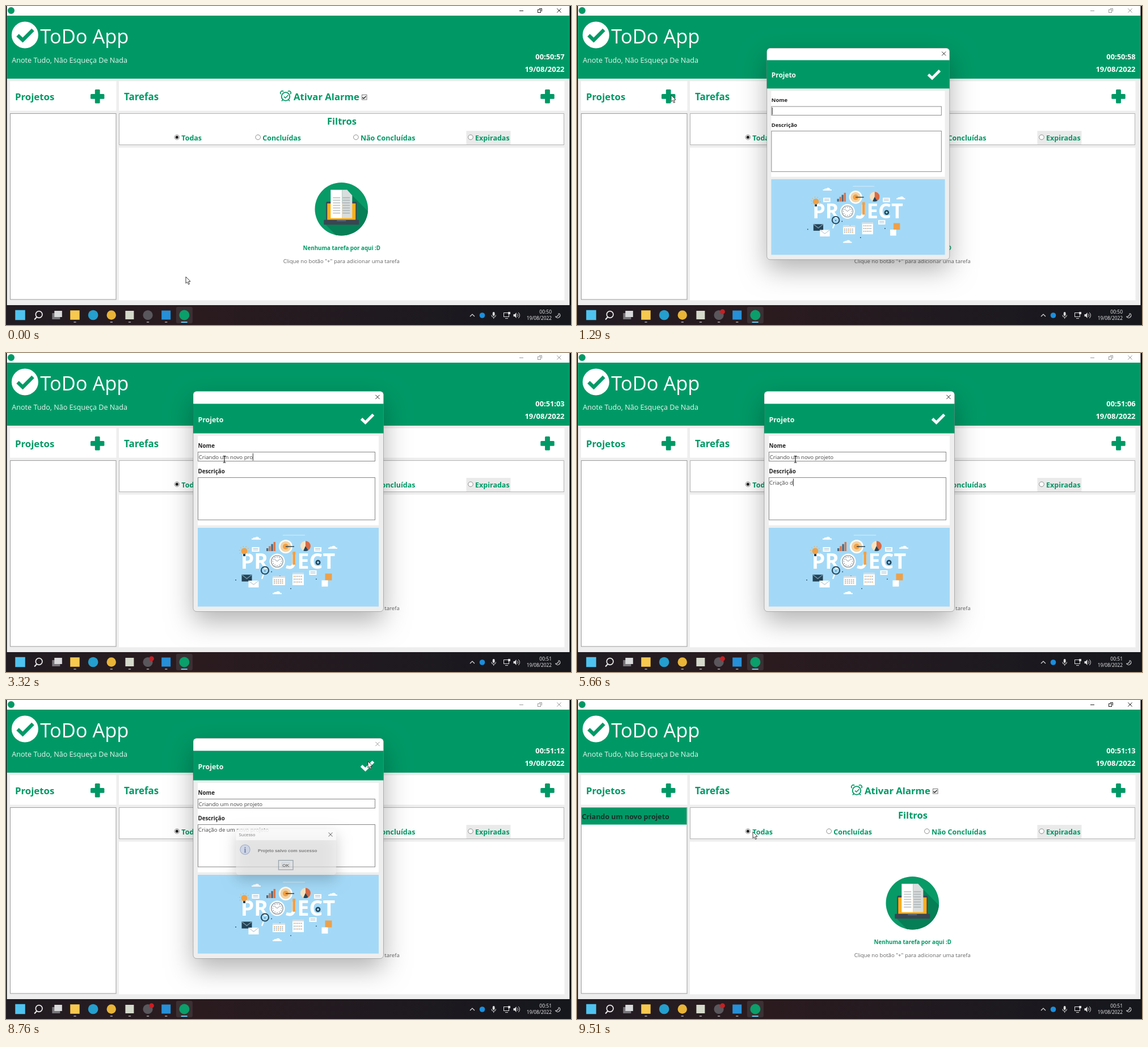
These frames come from a looping animation (996x562 px, 9.54 s). An HTML page with a canvas:

```html
<!DOCTYPE html>
<html lang="pt">
<head>
<meta charset="utf-8">
<title>ToDo App</title>
<style>
html, body { margin: 0; width: 100%; height: 100%; overflow: hidden; background: #000; }
canvas { display: block; width: 100%; height: 100%; }
</style>
</head>
<body>
<canvas id="stage" width="996" height="562"></canvas>
<script>
const ctx = document.getElementById('stage').getContext('2d');
const LOOP = 9540;
const OPEN = 1170, ALERT = 8668, CLOSE = 9090;
const GREEN = '#009966', NAVY = '#234357', ORANGE = '#f3a043', SKY = '#a3d9f7';
const SANS = '"Open Sans", "Noto Sans", sans-serif';
const ARIAL = '"Liberation Sans", sans-serif';
const NAME = 'Criando um novo projeto';
const ABOUT = 'Criação de um novo projeto';
const DATE = '19/08/2022';

// Keys: time, value
const SECONDS = [[0, 0], [960, 1], [3250, 6], [5300, 9], [8600, 15], [9270, 16]];
const NAME_KEYS = [[2720, 0], [3430, 23]];
const ABOUT_KEYS = [[5130, 0], [5660, 9.3], [7460, 20.4], [7960, 26]];
// Pointer moves: start, end, x, y
const MOVES = [[120, 900, 166, 157], [1550, 2350, 385, 187], [8110, 8500, 638, 108], [8830, 9010, 494, 291], [9090, 9480, 310, 232]];

const clamp = v => Math.max(0, Math.min(1, v));
const easeOut = p => 1 - (1 - p) * (1 - p);
const smooth = p => p * p * (3 - 2 * p);

function track(keys, t) {
  let a = keys[0];
  for (const b of keys) {
    if (t < b[0]) return b === a ? a[1] : a[1] + (b[1] - a[1]) * (t - a[0]) / (b[0] - a[0]);
    a = b;
  }
  return a[1];
}

function random(seed) {
  return () => (seed = seed * 16807 % 2147483647) / 2147483647;
}

function rect(x, y, w, h, color) {
  ctx.fillStyle = color;
  ctx.fillRect(x, y, w, h);
}

function round(x, y, w, h, r, color) {
  ctx.beginPath();
  ctx.roundRect(x, y, w, h, r);
  ctx.fillStyle = color;
  ctx.fill();
}

function square(x, y, size, color) {
  rect(x - size / 2, y - size / 2, size, size, color);
}

function frame(x, y, w, h, color, width = 1) {
  ctx.strokeStyle = color;
  ctx.lineWidth = width;
  ctx.strokeRect(x, y, w, h);
}

function disc(x, y, r, color, from = 0, to = 7) {
  ctx.beginPath();
  if (to < 7) ctx.moveTo(x, y);
  ctx.arc(x, y, r, from, to);
  ctx.fillStyle = color;
  ctx.fill();
}

function ring(x, y, r, color, width = 1, from = 0, to = 7) {
  ctx.beginPath();
  ctx.arc(x, y, r, from, to);
  ctx.strokeStyle = color;
  ctx.lineWidth = width;
  ctx.stroke();
}

function trace(pts) {
  ctx.beginPath();
  for (let i = 0; i < pts.length; i += 2) ctx.lineTo(pts[i], pts[i + 1]);
}

function line(color, width, ...pts) {
  trace(pts);
  ctx.strokeStyle = color;
  ctx.lineWidth = width;
  ctx.stroke();
}

function poly(color, ...pts) {
  trace(pts);
  ctx.closePath();
  ctx.fillStyle = color;
  ctx.fill();
}

function text(str, x, y, size, color, weight = 400, align = 'left', family = SANS) {
  ctx.font = `${weight} ${size}px ${family}`;
  ctx.textAlign = align;
  ctx.fillStyle = color;
  ctx.fillText(str, x, y);
}

function cross(x, y, r, color) {
  line(color, 1, x - r, y - r, x + r, y + r);
  line(color, 1, x - r, y + r, x + r, y - r);
}

// Tick mark of unit size s around its corner
function tick(x, y, s, color, width) {
  line(color, width, x - s * 0.5, y - s * 0.47, x, y, x + s, y - s);
}

function plus(x, y) {
  round(x - 12.2, y - 4.4, 24.4, 8.8, 1.5, GREEN);
  round(x - 4.4, y - 12.2, 8.8, 24.4, 1.5, GREEN);
}

function radio(label, x, on) {
  disc(x, 231.2, 4.4, '#fff');
  ring(x, 231.2, 4.3, '#8b8b8b');
  if (on) disc(x, 231.2, 2.6, '#222');
  text(label, x + 8, 237, 12.5, GREEN, 700);
}

function alarmIcon(x, y) {
  ring(x, y + 1, 7.3, GREEN, 1.8);
  for (const side of [-1, 1]) {
    const mid = -Math.PI / 2 + side * 0.8;
    ring(x + side * 6, y - 5.5, 3.2, GREEN, 1.6, mid - 1.55, mid + 1.55);
    line(GREEN, 1.8, x + side * 5, y + 6.5, x + side * 7, y + 9);
  }
  tick(x - 0.5, y + 3.5, 5, GREEN, 1.6);
}

function emptyIcon(x, y) {
  disc(x, y, 46.8, '#079a67');
  ctx.save();
  ctx.beginPath();
  ctx.arc(x, y, 46.8, 0, 7);
  ctx.clip();
  poly('#067f56', x + 19, y - 24, x + 70, y + 27, x + 20, y + 77, x - 28, y + 27);
  ctx.restore();
  round(x - 27, y - 13, 54, 35, 2, '#3b4552');
  rect(x - 25, y - 10, 50, 29, '#faae1b');
  rect(x - 19, y - 34, 20, 50, '#fff');
  poly('#d9dddd', x + 1, y - 34, x + 10, y - 34, x + 19, y - 24, x + 19, y + 16, x + 1, y + 16);
  for (let row = y - 21; row < y + 10; row += 4.5) {
    rect(x - 15, row, 13, 2, '#c6cbcc');
    rect(x + 2, row, 13, 2, '#b2b9bb');
  }
  round(x - 31, y + 19, 62, 8.5, 1, '#3b4552');
  rect(x - 8, y + 19, 16, 2.5, '#596575');
}

function titleBar(active) {
  const c = active ? '#222' : '#999';
  rect(1.5, 0, 992, 17, '#fff');
  disc(9, 8, 6, GREEN);
  line(c, 1, 905, 8.5, 912, 8.5);
  frame(937.5, 6.5, 5, 5, c);
  line(c, 1, 939.5, 4.5, 944.5, 4.5, 944.5, 9.5);
  cross(975, 8, 3.6, c);
}

function header(clock) {
  rect(1.5, 17, 992, 111, GREEN);
  disc(33.4, 51, 23.5, '#fff');
  tick(29.5, 60, 18, GREEN, 6.3);
  text('ToDo App', 60.3, 66.3, 34.4, '#fff');
  text('Anote Tudo, Não Esqueça De Nada', 10.3, 100.4, 12.6, '#e9f6f1');
  text(clock, 984.5, 93.5, 12.8, '#fff', 700, 'right');
  text(DATE, 984.5, 116, 13, '#fff', 700, 'right');
}

function mainWindow(clock, modal, saved) {
  rect(0, 0, 996, 562, '#000');
  rect(1.5, 17, 992, 511, '#eeeeee');
  titleBar(!modal);
  header(clock);

  rect(7, 132.5, 187.5, 52, '#fff');
  rect(199, 132.5, 785.5, 52, '#fff');
  text('Projetos', 16, 166.2, 16.8, GREEN, 700);
  text('Tarefas', 208, 166.2, 16.9, GREEN, 700);
  text('Ativar Alarme', 507, 166.2, 16.7, GREEN, 700);
  plus(161.2, 159.3);
  plus(954.5, 159.3);
  alarmIcon(493, 158.5);
  rect(627.5, 156.5, 8.5, 8.5, '#fff');
  frame(627.5, 156.5, 8.5, 8.5, '#777');
  tick(630.5, 163, 4, '#222', 1.5);

  rect(7, 189, 187, 328, '#fff');
  if (saved) {
    rect(8, 190, 185.5, 29.5, GREEN);
    text(NAME, 8.5, 209.8, 12.45, '#17312a', 700);
  }
  frame(7.5, 189.5, 186.5, 327.5, '#9b9b9b');
  rect(199, 189, 785, 55.5, '#fff');
  frame(199.5, 189.5, 784, 55, '#b4b4b4');
  rect(811.5, 220, 78, 24, '#eaeaea');
  text('Filtros', 592, 209, 16.6, GREEN, 700, 'center');
  radio('Todas', 301.3, true);
  radio('Concluídas', 444.2);
  radio('Não Concluídas', 616.9);
  radio('Expiradas', 819);

  rect(199, 249.5, 785.5, 269, '#fff');
  emptyIcon(591.3, 357.8);
  text('Nenhuma tarefa por aqui :D', 591.8, 429.5, 9.75, GREEN, 700, 'center');
  text('Clique no botão "+" para adicionar uma tarefa', 591.3, 453.3, 9.6, '#666', 400, 'center');
}

function tray(clock) {
  const y = 545, c = '#ddd';
  line(c, 1.2, 818, y + 2, 822, y - 2, 826, y + 2);
  disc(839.5, y, 4.8, '#1b8fdd');
  round(857.8, y - 6, 3.8, 7, 1.9, c);
  ring(859.7, y - 0.5, 3.8, c, 1, 0, Math.PI);
  line(c, 1, 859.7, y + 3.5, 859.7, y + 6);
  frame(877.5, y - 4.5, 9, 7, c);
  line(c, 1, 880, y + 5.5, 885, y + 5.5);
  square(887, y - 4, 4, c);
  rect(894.5, y - 2, 3, 4, c);
  poly(c, 895, y, 899.5, y - 5, 899.5, y + 5);
  for (const r of [3.5, 6.5]) ring(899, y, r, c, 1, -0.9, 0.9);
  text(clock.slice(0, 5), 962, 541.5, 8.5, '#eee', 400, 'right');
  text(DATE, 962, 553, 8.35, '#eee', 400, 'right');
  ring(972.5, y, 4.3, c, 1.2, -0.9, 2.5);
  ring(969.5, y - 2.5, 4.7, c, 1.1, -0.25, 1.85);
}

function taskbar(clock, recording) {
  const y = 544.5, slot = i => 25 + 32.15 * i;
  const g = ctx.createLinearGradient(0, 0, 996, 0);
  ['#201c22', '#2b1b1f', '#1f1a20', '#15171d'].forEach((c, i) => g.addColorStop(i / 3, c));
  rect(0, 527, 996, 35, g);
  square(slot(0), y, 17.5, '#4fc3f0');
  ring(slot(1) + 1, y - 1, 5.8, '#eee', 1.7);
  line('#eee', 1.9, slot(1) - 3, y + 3.5, slot(1) - 7, y + 8);
  rect(slot(2) - 8, y - 3.5, 14, 11, '#77747a');
  rect(slot(2) - 4, y - 7.5, 13.5, 11, '#d9d9db');
  square(slot(3), y, 16.5, '#f8c94f');
  disc(slot(4), y, 8.8, '#249fce');
  disc(slot(5), y, 8.2, '#e9b437');
  square(slot(6), y, 15, '#d5d9cb');
  disc(slot(7), y, 8.6, '#5a575c');
  if (recording) disc(slot(7) + 6.5, y - 6, 4.3, '#c71f24');
  square(slot(8), y, 16, '#268fd8');
  round(slot(9) - 14.5, 530, 29, 29, 3, '#3b3033');
  disc(slot(9), y, 9, '#0a9f6b');
  for (let i = 3; i < 9; i++) if (i !== 4) round(slot(i) - 2.2, 556, 4.5, 1.8, 0.9, '#9a9699');
  round(slot(9) - 6, 556, 11.5, 2, 1, '#62c8f2');
  tray(clock);
}

function cloud(x, y) {
  disc(x - 3, y, 3, '#fff', Math.PI, 2 * Math.PI);
  disc(x + 1.5, y, 4.3, '#fff', Math.PI, 2 * Math.PI);
  rect(x - 8, y - 1.2, 16, 2, '#fff');
}

function card(x, y) {
  rect(x - 6.5, y - 4, 13, 8, '#fff');
  for (let i = -1.5; i < 3; i += 2.5) line('#9ab8c8', 0.9, x - 4.5, y + i, x + 4.5, y + i);
}

function mail(x, y, body, flap) {
  rect(x - 9, y - 6, 18, 12, body);
  line(flap, 1.4, x - 9, y - 6, x, y + 1, x + 9, y - 6);
}

function calendar(x, y, w, h) {
  const left = x - w / 2, top = y - h / 2;
  rect(left, top, w, h, '#fff');
  rect(left, top, w, 3, '#d5dde2');
  for (let r = 0; r < 3; r++)
    for (let c = 0; c < 5; c++)
      rect(left + 2 + c * (w - 4) / 5, top + 5.5 + r * (h - 7) / 3, 2, 2, (r + c) % 3 ? '#a9bac5' : '#e9b070');
}

function bulb(x, y) {
  disc(x, y, 5.5, ORANGE);
  rect(x - 2, y + 5, 4, 4, NAVY);
  for (let a = 2.7; a < 7; a += 0.6) {
    const dx = Math.cos(a), dy = Math.sin(a);
    line(ORANGE, 0.9, x + 7.3 * dx, y + 7.3 * dy, x + 9.3 * dx, y + 9.3 * dy);
  }
}

function dial(x, y) {
  disc(x, y, 13.5, '#fff');
  ring(x, y, 10.3, '#7b878e', 1.1);
  for (let a = 0; a < 6.2; a += Math.PI / 6) disc(x + 7.6 * Math.cos(a), y + 7.6 * Math.sin(a), 0.8, '#7b878e');
  line('#8b969c', 1, x - 5, y - 4, x, y, x + 5, y - 4);
}

function poster() {
  rect(338, 308, 319, 138.7, SKY);
  cloud(441, 328);
  cloud(576, 344);
  cloud(478, 424);
  line('#d6eefb', 1, 488, 321, 527, 321);
  const rand = random(11);
  for (let i = 0; i < 9; i++) disc(405 + 165 * rand(), 382 + 40 * rand(), 0.9, NAVY);

  text('PR', 413.8, 380, 37.5, '#fff', 700);
  text('ECT', 513.5, 380, 37.5, '#fff', 700);
  dial(478, 367);
  ctx.beginPath();
  ctx.moveTo(507.5, 355);
  ctx.lineTo(507.5, 370);
  ctx.quadraticCurveTo(506, 381, 494, 376.5);
  ctx.strokeStyle = '#fff';
  ctx.lineWidth = 5.5;
  ctx.stroke();
  rect(505.3, 350, 4.8, 23, ORANGE);

  bulb(420, 349);
  card(440, 346);
  for (let i = 0; i < 4; i++) {
    const h = 5 + 3.7 * i;
    rect(459 + i * 4.2, 349 - h, 3.4, h, i % 2 ? '#d8754a' : '#52677a');
  }
  disc(493, 341, 12, '#fff');
  disc(493, 341, 9.5, '#f2d3a4');
  disc(493, 341, 5, ORANGE);
  line(NAVY, 1.5, 493, 341, 508, 341);
  disc(528, 340, 9, '#f8e3c0');
  disc(528, 340, 9, '#d96a45', -1.57, 1);
  disc(528, 340, 9, NAVY, 1, 2);
  card(549.5, 346);
  ring(550, 369, 3.2, NAVY, 2.6);

  line('#fff', 2.2, 454.5, 389, 451, 398);
  ring(456.5, 383, 6.6, NAVY, 2);
  mail(424.5, 396.5, NAVY, '#7895a6');
  mail(436.5, 407, '#fff', '#c6d5de');
  calendar(481, 401, 22, 16);
  calendar(515, 398, 20, 22);
  card(541, 387);
  square(568.5, 394.5, 12, '#eda14a');
  square(562, 406, 11, '#fff');
}

function zoomed(x, y, scale, alpha, draw) {
  ctx.save();
  ctx.translate(x, y);
  ctx.scale(scale, scale);
  ctx.translate(-x, -y);
  ctx.globalAlpha = alpha;
  draw();
  ctx.restore();
}

function panel(x, y, w, h, r, bar, blur) {
  ctx.save();
  ctx.shadowColor = 'rgba(0,0,0,.3)';
  ctx.shadowBlur = blur;
  ctx.shadowOffsetY = blur * 0.38;
  round(x, y, w, h, r, '#eeeeee');
  ctx.restore();
  round(x, y, w, bar, [r, r, 0, 0], '#fff');
}

function caret(str, x, y) {
  ctx.font = `400 9.65px ${SANS}`;
  rect(x + ctx.measureText(str).width, y, 1, 13, '#333');
}

function dialog(t) {
  panel(330, 67.5, 335.5, 388, 6, 22, 46);
  cross(655, 77.5, 3.6, t > ALERT ? '#999' : '#222');
  rect(330, 89.5, 335.5, 52, GREEN);
  text('Projeto', 338.5, 121.8, 12.35, '#f3faf7', 700);
  tick(633.5, 122.5, 14, '#fff', 5);
  rect(338, 146, 319, 157.5, '#fff');
  text('Nome', 338.5, 166.5, 9.8, '#222', 700);
  frame(338.5, 174.5, 312, 16, '#858585');
  text('Descrição', 338.5, 212.4, 9.75, '#222', 700);
  frame(338.5, 219.5, 312, 74.5, '#858585');
  const name = NAME.slice(0, track(NAME_KEYS, t));
  const about = ABOUT.slice(0, track(ABOUT_KEYS, t));
  text(name, 339.7, 187.2, 9.65, '#444');
  text(about, 339, 232.2, 9.65, '#444');
  if (t < 4000) caret(name, 339.5, 176.5);
  else if (t < 8450) caret(about, 339, 221.5);
  poster();
  ctx.beginPath();
  ctx.roundRect(330, 67.5, 335.5, 388, 6);
  ctx.strokeStyle = 'rgba(90,90,90,.5)';
  ctx.lineWidth = 0.8;
  ctx.stroke();
}

function alertBox() {
  panel(405.5, 227.5, 176.5, 80.5, 5, 19.5, 24);
  text('Sucesso', 410.5, 239.8, 7.7, '#333');
  cross(572, 237, 3.5, '#222');
  disc(421.5, 263.5, 9, '#c3cde6');
  ring(421.5, 263.5, 8.6, '#8493b8');
  text('i', 421.5, 268.5, 14, '#3f5590', 700, 'center', '"Liberation Serif", serif');
  text('Projeto salvo com sucesso', 444, 268.3, 8.1, '#444', 700, 'left', ARIAL);
  frame(480.5, 282.5, 25.5, 16.5, '#72818f', 1.3);
  frame(486.5, 286.5, 13.5, 8.5, '#a9bccf', 0.8);
  text('OK', 493.2, 294, 8, '#333', 700, 'center', ARIAL);
}

function pointer(t) {
  let x = 317, y = 477;
  for (const [from, to, nextX, nextY] of MOVES) {
    const p = smooth(clamp((t - from) / (to - from)));
    x += (nextX - x) * p;
    y += (nextY - y) * p;
  }
  const overField = t > OPEN && t < ALERT && x > 338 && x < 651 && y > 174 && y < 191;
  if (overField) {
    line('#222', 1.2, x, y - 5, x, y + 6);
    for (const end of [-5.5, 6]) line('#222', 1, x - 2.5, y + end, x + 2.5, y + end);
    return;
  }
  ctx.save();
  ctx.translate(x, y);
  poly('#fff', 0, 0, 0, 11.5, 2.6, 9.2, 4.6, 13.5, 6.5, 12.7, 4.6, 8.5, 8, 8.2);
  ctx.strokeStyle = '#222';
  ctx.lineWidth = 0.9;
  ctx.stroke();
  ctx.restore();
}

function clockAt(t) {
  const s = 50 * 60 + 57 + Math.floor(track(SECONDS, t));
  const pad = n => String(n).padStart(2, '0');
  return `00:${pad(Math.floor(s / 60))}:${pad(s % 60)}`;
}

function draw(t) {
  const clock = clockAt(t);
  const saved = t >= CLOSE + 60;
  mainWindow(clock, t >= OPEN && !saved, saved);
  taskbar(clock, t > 1050);

  const grow = from => 0.9 + 0.1 * easeOut(clamp((t - from) / 330));
  const show = (from, rise) => clamp((t - from) / rise);
  const dialogOut = clamp((t - CLOSE) / 150);
  const alertOut = clamp((t - CLOSE + 20) / 90);
  if (t >= OPEN && dialogOut < 1)
    zoomed(447, 238, grow(OPEN) - 0.06 * dialogOut, show(OPEN, 110) * (1 - dialogOut), () => dialog(t));
  if (t >= ALERT && alertOut < 1)
    zoomed(493.7, 267.8, grow(ALERT) / 0.948, show(ALERT, 145) * (1 - alertOut), alertBox);
  pointer(t);
}

const start = performance.now();
function loop() {
  draw((performance.now() - start) % LOOP);
  requestAnimationFrame(loop);
}
loop();
</script>
</body>
</html>
```
